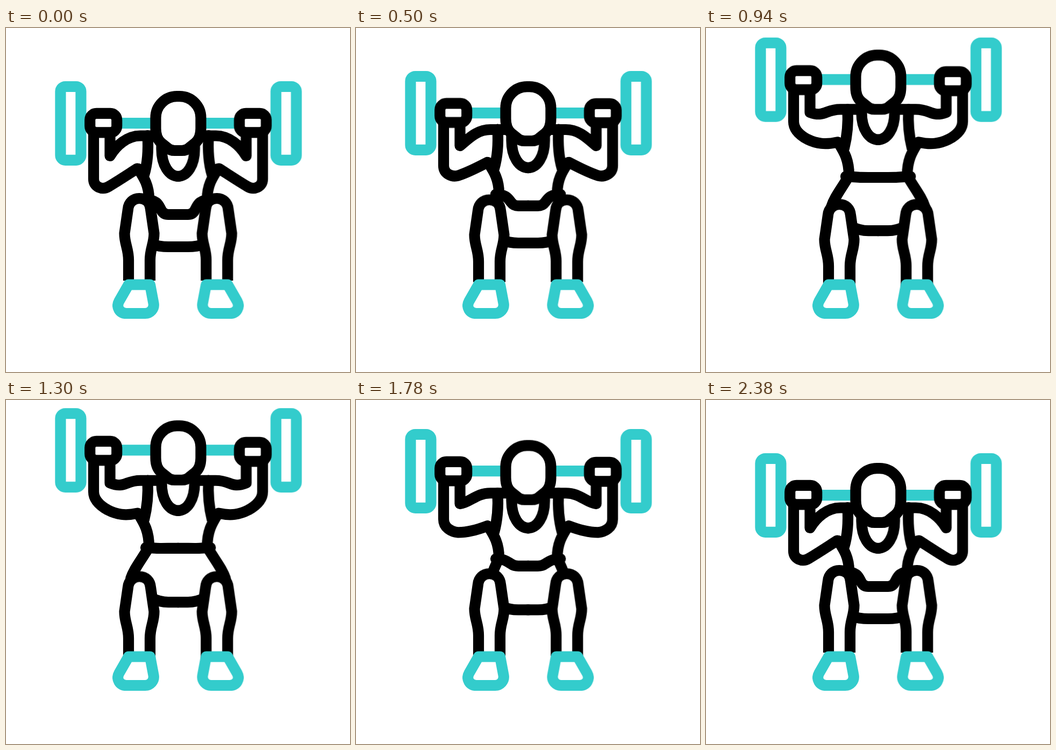
Animation of 640x640 px, one loop 2.4 s. Source, as an HTML page:

```html
<!DOCTYPE html>
<html lang="en">
<head>
<meta charset="utf-8">
<title>Squat</title>
<style>
  html, body { margin: 0; width: 100%; height: 100%; overflow: hidden; background: #fff; }
  svg { display: block; width: 100%; height: 100%; }
  path, rect { fill: none; stroke: #000; stroke-width: 20.2; stroke-linecap: round; stroke-linejoin: round; }
  .teal { stroke: #33cccc; }
  .solid { fill: #fff; }
  .flat { stroke-linecap: butt; }

  /* --a is the low pose, --b the high pose */
  .morph { animation: morph 2.4s cubic-bezier(.78, 0, .22, 1) infinite; }
  .move { animation: move 2.4s cubic-bezier(.78, 0, .22, 1) infinite; }
  @keyframes morph {
    0%, 99.167%, 100% { d: var(--a); }
    50% { d: var(--b); }
  }
  @keyframes move {
    0%, 99.167%, 100% { transform: translateY(0); }
    50% { transform: translateY(var(--lift)); }
  }

  .weight { --lift: -84.2px; }
  .plate { x: 101.4px; }
  .right .plate { x: 100.2px; }
  .hand { --lift: -82.5px; }
  .right .hand { --lift: -80.5px; }
  .head { --lift: -79.5px; }
  .leg { --lift: 11.5px; }

  .neck {
    --a: path("M289.5 200V225C289.5 255 303 276 321 276");
    --b: path("M289.5 149.5V155C289.5 185 303 205.5 321 205.5");
  }
  .armhole {
    --a: path("M263.5 200C265 225 264 250 257 273");
    --b: path("M263.5 149.5C265 176 263 198 257 222");
  }
  .flank {
    --a: path("M246 262C257 279 266 293 266 318");
    --b: path("M246 211C257 229 266 243 266 273");
  }
  .upper {
    --a: path("M193.5 195V238C205 219 225 200.5 250 200.5L289.5 200.5");
    --b: path("M193.5 113V154C221 165 222 149.5 250 149.5L289.5 149.5");
  }
  .lower {
    --a: path("M163 195V281C163 296 179 302 191 295C208 285 226 273 244 261.5");
    --b: path("M163 113V170C163 186 175 196 189 204C206 213 222 215.5 245 210.5");
  }
  .band {
    --a: path("M260 319.5C282 319.5 284 330 289 339C292 345 297 347 302 347H321");
    --b: path("M260 274.5C272 275 281 276 289 275.7C293 275.5 297 275.5 302 275.5H321");
  }
  .hip {
    --a: path("M265 320C267 325 270 330 272 335");
    --b: path("M265 275C250 300 238 314 232 332");
  }
  .hem {
    --a: path("M270 402C282 406 292 407 302 407H321");
    --b: path("M270 368C282 374 292 376 302 376H321");
  }
</style>
</head>
<body>
<svg viewBox="0 0 640 640">
  <g class="left">
    <g class="weight move">
      <path class="teal flat" d="M200 177.2H321"/>
      <rect class="plate teal" y="109" width="38" height="136.8" rx="9"/>
    </g>
    <path class="neck morph"/>
    <path class="armhole morph"/>
    <path class="flank morph"/>
    <path class="upper morph"/>
    <path class="lower morph"/>
    <path class="hip morph"/>
    <path class="band morph"/>
    <path class="hem morph"/>
    <rect class="hand move solid" x="156.2" y="158.8" width="50" height="35.5" rx="12"/>
    <path class="leg move solid flat" d="M228 470V432C228 410 220.5 402 220.5 382L227 337C228 325 237 317 248 317C260 317 268 325 269 337L275.5 382C275.5 402 268 410 268 432V470"/>
    <path class="teal solid" d="M228 477.5H268L274.5 512C276.5 523 268 531 259 531H224C211 531 204.5 519 210.5 508Z"/>
  </g>
  <path class="head move solid" d="M318 127.2H323C345 127.2 362.5 145 362.5 167V187C362.5 198 359 208 352 214L342 222C337 227 332 228 327 228H314C309 228 304 227 299 222L289 214C282 208 278.5 198 278.5 187V167C278.5 145 296 127.2 318 127.2Z"/>
</svg>
<script>
  // The right half mirrors the left one.
  const left = document.querySelector('.left');
  const right = left.cloneNode(true);
  right.setAttribute('class', 'right');
  right.setAttribute('transform', 'matrix(-1 0 0 1 640.4 0)');
  left.after(right);
</script>
</body>
</html>
```
